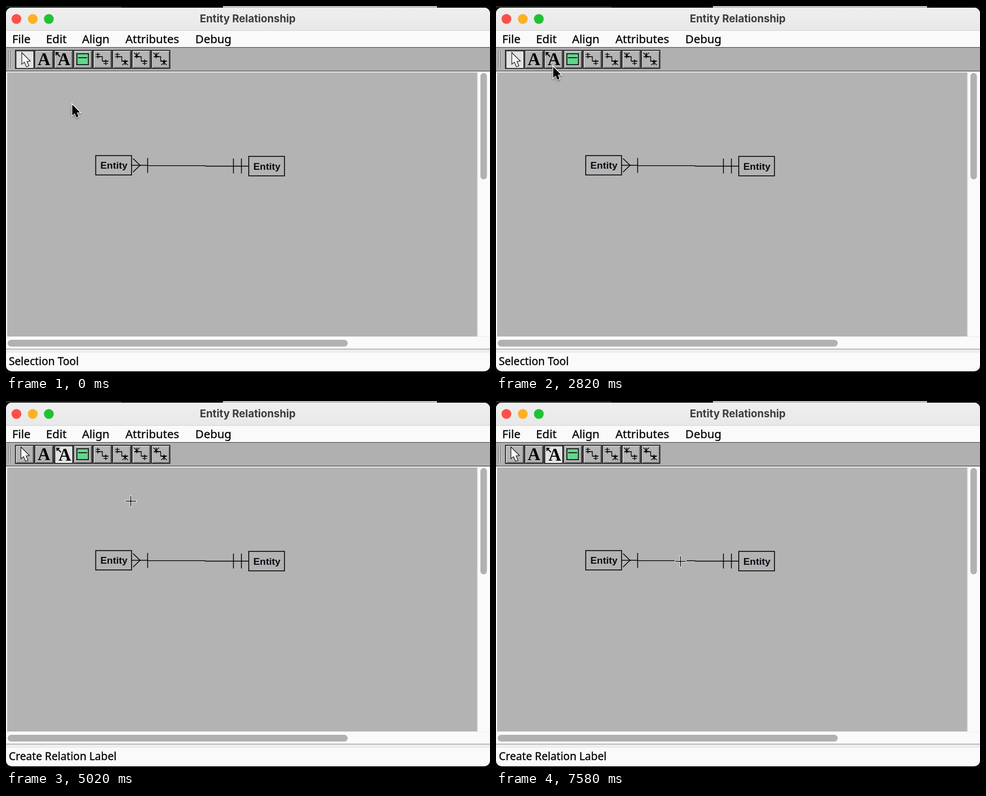
An HTML page with a canvas for the animation above (8 s loop, 859 px wide and 652 px high).

```html
<!DOCTYPE html>
<html lang="en">
<head>
<meta charset="utf-8">
<title>Entity Relationship</title>
<style>
html, body { margin: 0; width: 100%; height: 100%; overflow: hidden; background: #000; }
canvas { display: block; width: 859px; height: 652px; }
</style>
</head>
<body>
<canvas id="stage" width="859" height="652"></canvas>
<script>
const ctx = document.getElementById('stage').getContext('2d');
const LOOP = 8000;
const PRESS_AT = 3500;
const GREY = '#b3b3b3';
const MENU_FONT = '20.4px "Noto Sans", sans-serif';
const STATUS_FONT = '19.2px "Noto Sans", sans-serif';

// Pointer path: time, x, y
const PATH = [
  [0, 117, 174], [280, 117, 174], [1000, 115, 165], [2200, 115, 165],
  [2820, 101, 107], [3060, 100, 98], [4620, 100, 98], [5380, 324, 246],
  [5700, 324, 246], [6480, 331, 282], [6800, 331, 282], [7480, 327, 285], [LOOP, 327, 285]
];

function rect(x, y, w, h, color) {
  ctx.fillStyle = color;
  ctx.fillRect(x, y, w, h);
}

function round(x, y, w, h, r, color) {
  ctx.beginPath();
  ctx.roundRect(x, y, w, h, r);
  ctx.fillStyle = color;
  ctx.fill();
}

function line(points, width = 1.4, color = '#000') {
  ctx.beginPath();
  points.forEach(([x, y], i) => i ? ctx.lineTo(x, y) : ctx.moveTo(x, y));
  ctx.lineWidth = width;
  ctx.strokeStyle = color;
  ctx.stroke();
}

function polygon(points, fill, stroke, width) {
  ctx.beginPath();
  points.forEach(([x, y]) => ctx.lineTo(x, y));
  ctx.closePath();
  ctx.lineWidth = width;
  ctx.strokeStyle = stroke;
  ctx.stroke();
  ctx.fillStyle = fill;
  ctx.fill();
}

function text(str, x, y, font, color = '#000', align = 'left') {
  ctx.font = font;
  ctx.textAlign = align;
  ctx.fillStyle = color;
  ctx.fillText(str, x, y);
}

function uiText(str, x, y, font) {
  text(str, x, y, font);
  ctx.lineWidth = 0.3;
  ctx.strokeStyle = '#000';
  ctx.strokeText(str, x, y);
}

function drawWindow() {
  rect(0, 0, 859, 652, '#080808');
  rect(0, 0, 205, 3, '#242621');
  rect(385, 0, 380, 3, '#bcbcb8');
  round(0, 3, 859, 646, 10, '#f9faf9');

  const bar = ctx.createLinearGradient(0, 3, 0, 43);
  bar.addColorStop(0, '#f0eff0');
  bar.addColorStop(1, '#e9e8e9');
  round(0, 3, 859, 40, [10, 10, 0, 0], bar);
  rect(0, 43, 859, 1, '#d4d4d4');
  [[18.5, '#fd5049'], [47.5, '#fdb124'], [76, '#20c233']].forEach(([x, color]) => {
    ctx.beginPath();
    ctx.arc(x, 23, 8.7, 0, Math.PI * 2);
    ctx.fillStyle = color;
    ctx.fill();
  });
  text('Entity Relationship', 429, 28.5, '700 18.6px Inter, sans-serif', '#3c3c3c', 'center');

  [['File', 11], ['Edit', 71], ['Align', 135], ['Attributes', 212], ['Debug', 336]]
    .forEach(([label, x]) => uiText(label, x, 66, MENU_FONT));

  rect(0, 73, 859, 1.5, '#4c504c');
  rect(0, 74.5, 859, 40.5, '#b0b0b0');
  rect(0, 115, 859, 1.2, '#454545');
  for (const x of [4, 8]) {
    rect(x, 79, 1, 31, '#747474');
    rect(x + 1, 79, 1, 31, '#d8d8d8');
  }

  rect(2, 118, 834.5, 469, GREY);
  rect(836.5, 117, 1, 471, '#e4e4e4');
  rect(0, 587, 859, 1, '#ededed');
  round(842, 119, 11.5, 189, 5.7, '#b1b1b1');
  round(3, 593, 603.5, 12, 6, '#b1b1b1');
  rect(0, 609, 859, 1.2, '#8c8f94');
  rect(0, 610.2, 859, 6, '#ededed');
}

function arrowIcon(x, y) {
  const tip = [[0, 0], [0, 18.5], [4.3, 15], [8, 23.5], [11.5, 22], [8, 14], [13.5, 13.5]];
  polygon(tip.map(([a, b]) => [x + a, y + b]), '#f8f8f8', '#000', 2);
}

function letterIcon(x, y) {
  text('A', x, y, '700 31px "Liberation Serif", serif', '#000', 'center');
}

function labelIcon(x, y) {
  letterIcon(x + 18, y + 27);
  line([[x + 4, y + 5], [x + 11, y + 12]], 1.8);
  polygon([[x + 3, y + 4], [x + 9, y + 4.5], [x + 3.5, y + 10]], '#000', '#000', 0.5);
}

function tableIcon(x, y) {
  rect(x, y, 22, 21, '#000');
  rect(x + 1.5, y + 1.5, 19, 18, '#65d58c');
  rect(x + 3, y + 7, 16, 1.6, '#06130a');
}

// End mark of a relation: bars for "one", crossed lines for "many"
function endMark(x, y, many) {
  line([[x, y - 5], [x, y + 5]], 1.3);
  if (many) {
    line([[x - 5, y - 5], [x + 4, y + 3]], 1.2);
    line([[x + 5, y - 5], [x - 4, y + 3]], 1.2);
    line([[x - 4, y + 2], [x + 4, y + 2]], 1.2);
  } else {
    line([[x - 4, y - 2], [x + 4, y - 2]], 1.2);
    line([[x - 4, y + 2], [x + 4, y + 2]], 1.2);
  }
}

function relationIcon(x, y, fromMany, toMany) {
  line([[x + 8, y + 12], [x + 17, y + 12], [x + 17, y + 20], [x + 28, y + 20]], 1.3);
  endMark(x + 9, y + 10, fromMany);
  ctx.save();
  ctx.translate(x + 23, y + 22);
  if (toMany) ctx.scale(1, -1);
  endMark(0, 0, toMany);
  ctx.restore();
}

const ICONS = [
  (x, y) => arrowIcon(x + 11, y + 5),
  (x, y) => letterIcon(x + 17, y + 26.5),
  (x, y) => labelIcon(x, y),
  (x, y) => tableIcon(x + 5.5, y + 6),
  (x, y) => relationIcon(x, y, false, false),
  (x, y) => relationIcon(x, y, false, true),
  (x, y) => relationIcon(x, y, true, false),
  (x, y) => relationIcon(x, y, true, true)
];

function drawToolbar(selected) {
  ICONS.forEach((icon, i) => {
    const x = 16 + i * 34.5, y = 78, on = i === selected;
    rect(x, y, 34, 33.5, '#111');
    rect(x + 1.5, y + 1.5, 31, 30.5, on ? '#858585' : '#dedede');
    rect(x + 3, y + 3, 29.5, 29, on ? '#f5f5f5' : '#777');
    rect(x + 3, y + 3, 28, 27.5, on ? '#e3e3e3' : '#b4b4b4');
    icon(x + (on ? 1.5 : 0), y + (on ? 1 : 0));
  });
}

function entity(x, y) {
  ctx.lineWidth = 1.5;
  ctx.strokeStyle = '#000';
  ctx.strokeRect(x, y, 63.5, 34.5);
  text('Entity', x + 32.3, y + 23.3, '700 17.3px "Liberation Sans", sans-serif', '#0a0a12', 'center');
}

function drawDiagram() {
  entity(159.3, 265.7);
  entity(430.8, 267.2);
  line([[223, 283], [251, 283]]);
  line([[225.5, 271], [238, 283], [225.5, 295]]);
  line([[251.4, 270], [251.4, 296.5]]);
  line([[251, 283.6], [353, 283.6], [354, 284.5], [430, 284.5]]);
  for (const x of [403.6, 417.8]) line([[x, 271], [x, 297.5]]);
}

function pointer(x, y) {
  const shape = [[0, 0], [0, 18.5], [4.2, 14.6], [7.3, 22], [10.6, 20.6], [7.5, 13.4], [13, 13.2]];
  ctx.save();
  ctx.shadowColor = 'rgba(0,0,0,.4)';
  ctx.shadowBlur = 3;
  ctx.shadowOffsetY = 1.5;
  const points = shape.map(([a, b]) => [x + a + 0.8, y + b + 1.5]);
  polygon(points, '#000', '#fff', 3);
  ctx.restore();
  ctx.beginPath();
  points.forEach(([a, b]) => ctx.lineTo(a, b));
  ctx.fillStyle = '#000';
  ctx.fill();
}

function crosshair(x, y) {
  for (const [width, color, r] of [[3.6, '#f4f4f4', 10.5], [1.4, '#000', 9.5]]) {
    line([[x - r, y], [x + r, y]], width, color);
    line([[x, y - r], [x, y + r]], width, color);
  }
}

function position(t) {
  const i = PATH.findIndex(p => p[0] > t);
  const [t0, x0, y0] = PATH[i - 1], [t1, x1, y1] = PATH[i];
  const u = (t - t0) / (t1 - t0), k = u * u * (3 - 2 * u);
  return [x0 + (x1 - x0) * k, y0 + (y1 - y0) * k].map(Math.round);
}

function draw(now) {
  const t = now % LOOP;
  const pressed = t >= PRESS_AT;
  const [x, y] = position(t);
  drawWindow();
  drawToolbar(pressed ? 2 : 0);
  drawDiagram();
  uiText(pressed ? 'Create Relation Label' : 'Selection Tool', 5, 637.5, STATUS_FONT);
  if (pressed && y > 117) crosshair(x + 0.5, y);
  else pointer(x, y);
}

const start = performance.now();
function tick() {
  draw(performance.now() - start);
  requestAnimationFrame(tick);
}
tick();
</script>
</body>
</html>
```
